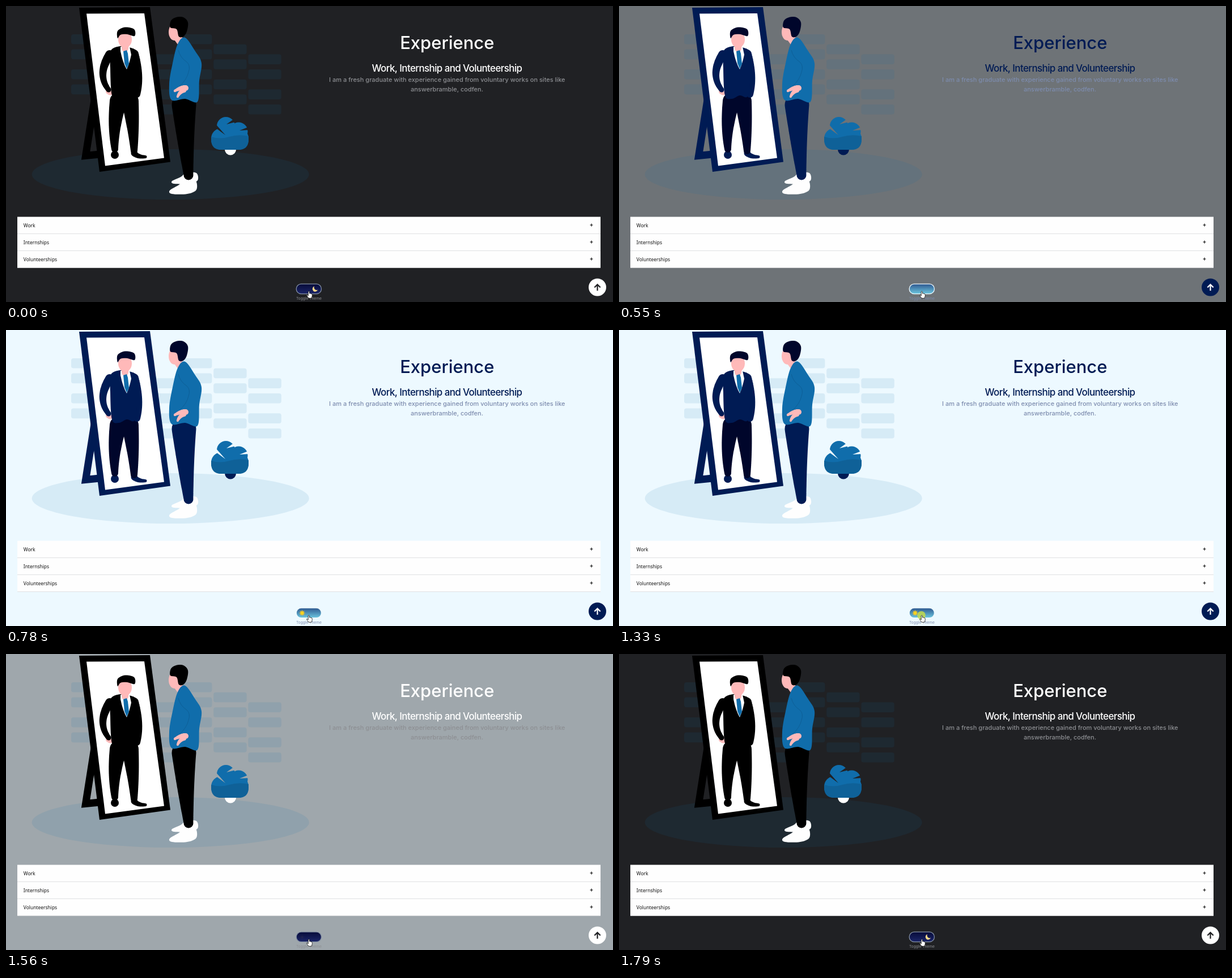
Recreate the animation shown at these times as an HTML page with a canvas. Size 1071 by 523 pixels, loop 1.87 s.

```html
<!DOCTYPE html>
<html lang="en">
<head>
<meta charset="utf-8">
<title>Theme toggle</title>
<style>
html, body { margin: 0; width: 100%; height: 100%; overflow: hidden; background: #202124; }
canvas { display: block; width: 1071px; height: 523px; }
</style>
</head>
<body>
<canvas id="stage"></canvas>
<script>
const W = 1071, H = 523, LOOP = 1870;
const TO_LIGHT = 470, TO_DARK = 1480, PRESS = 150;
const canvas = document.getElementById('stage');
const ctx = canvas.getContext('2d');
const ratio = window.devicePixelRatio || 1;
canvas.width = W * ratio;
canvas.height = H * ratio;

const BLUE = '#106dab', SKIN = '#ffb9b9', WHITE = '#ffffff';
const DARK = { ink: '#000000', deep: '#000000', title: WHITE, para: '#8d8f93', pot: WHITE,
  button: WHITE, arrow: '#202124', ring: '#8390a4', top: '#080d3c', bottom: '#1b2567' };
const LIGHT = { ink: '#001b54', deep: '#00062b', title: '#001b54', para: '#7d8cae', pot: '#001b54',
  button: '#001b54', arrow: WHITE, ring: '#edf9ff', top: '#315d93', bottom: '#6bc3dd' };

const lerp = (a, b, k) => a + (b - a) * k;

// The fade is shown in four held steps with an ease-out.
function fade(t, start) {
  const step = Math.floor((t - start + 3) / 77.5);
  return Math.min(Math.max(step / 4, 0), 1) ** .7;
}

function fill(color, path) {
  ctx.fillStyle = color;
  ctx.fill(path);
}

function line(color, width, path) {
  ctx.strokeStyle = color;
  ctx.lineWidth = width;
  ctx.stroke(new Path2D(path));
}

function ellipse(color, x, y, rx, ry = rx) {
  const path = new Path2D();
  path.ellipse(x, y, rx, ry, 0, 0, Math.PI * 2);
  fill(color, path);
}

function pill(color, x, y, w, h, r) {
  const path = new Path2D();
  path.roundRect(x, y, w, h, r);
  fill(color, path);
}

// Closed smooth curve through a few key points.
function blob(color, p) {
  const n = p.length, at = i => p[(i + n) % n], path = new Path2D();
  path.moveTo(...p[0]);
  for (let i = 0; i < n; i++) {
    const [a, b, c, d] = [at(i - 1), at(i), at(i + 1), at(i + 2)];
    path.bezierCurveTo(b[0] + (c[0] - a[0]) / 6, b[1] + (c[1] - a[1]) / 6,
      c[0] - (d[0] - b[0]) / 6, c[1] - (d[1] - b[1]) / 6, c[0], c[1]);
  }
  fill(color, path);
}

// Tapered limb: discs along a curve from a over b to c.
function limb(color, a, b, c, r0, r1) {
  const path = new Path2D(), n = 60;
  for (let i = 0; i <= n; i++) {
    const k = i / n, r = lerp(r0, r1, k);
    const [x, y] = [0, 1].map(j => lerp(lerp(a[j], b[j], k), lerp(b[j], c[j], k), k));
    path.moveTo(x + r, y);
    path.arc(x, y, r, 0, Math.PI * 2);
  }
  fill(color, path);
}

function label(text, x, y, font, color, align = 'center', spacing = 0) {
  ctx.font = font;
  ctx.textAlign = align;
  ctx.letterSpacing = spacing + 'px';
  ctx.fillStyle = color;
  ctx.fillText(text, x, y);
}

function drawWall() {
  const tint = 'rgba(16,112,169,.1)', rows = [0, 26.6, 62, 88.6];
  ellipse(tint, 290.2, 297.5, 244.5, 44.5);
  const column = (x, shift) => rows.forEach(y => pill(tint, x, 50 + shift * 17.65 + y, 58.4, 17.6, 4));
  for (let i = 0; i < 3; i++) column(305 + i * 61.2, i);
  column(243.6, 2);
  column(115, 0);
}

function drawMirror(c) {
  line(c.ink, 13, 'M157 160L140.6 264.4L165 262');
  fill(c.ink, new Path2D('M129 3L254 2L290 275.5L165 293Z'));
  fill(WHITE, new Path2D('M142 13.5L244 13L279 268.5L175 282.5Z'));
}

function drawReflection(c) {
  ellipse(c.ink, 192, 263, 7);
  limb(c.ink, [226, 260], [232, 267], [246, 266.5], 5.5, 2.5);
  limb(c.deep, [198, 168], [189, 215], [192, 253], 15, 6);
  limb(c.deep, [219, 168], [225, 215], [226, 256], 15, 6);
  limb(SKIN, [180, 151], [182, 153], [184, 154], 4, 3.5);
  limb(c.ink, [183, 86], [160, 121], [181, 148], 8, 4.5);
  limb(c.ink, [226, 85], [238, 125], [231, 156], 8, 6);
  blob(c.ink, [[202, 71], [185, 79], [184, 110], [187, 158], [199, 164], [213, 158],
    [228, 158], [232, 110], [231, 81], [217, 73]]);
  fill(WHITE, new Path2D('M202 72L218 72L221 86Q218 101 213 112Q206 100 202 80Z'));
  ellipse(SKIN, 210, 59, 12, 15);
  limb(SKIN, [210, 67], [210, 71], [210, 75], 7, 6);
  fill(BLUE, new Path2D('M207 80L213 78L215 84L217 102L213 111L209 101Z'));
  blob(c.deep, [[197, 57], [197, 44], [210, 37.5], [226, 41], [227, 53], [214, 50], [202, 51]]);
}

function sneaker(x, y, w, h) {
  const shape = [[0, .75], [.35, .35], [.55, 0], [.95, 0], [1, .7], [.65, 1], [.08, 1]];
  blob('#fefefe', shape.map(([u, v]) => [x + u * w, y + v * h]));
}

function drawMan(c) {
  sneaker(293, 295, 45, 19);
  sneaker(289, 307, 47, 25);
  limb(c.ink, [314, 175], [316, 232], [322, 299], 21.5, 8.5);
  ellipse(SKIN, 297, 46, 10, 15);
  limb(SKIN, [302, 55], [306, 60], [310, 66], 7, 7);
  blob(BLUE, [[316, 56], [303, 67], [294, 101], [288, 138], [292, 166], [316, 164],
    [338, 169], [341, 132], [345, 101], [334, 80]]);
  line('#0d5c92', .8, 'M304 78Q307 91 319 99Q326 105 322 117Q319 130 306 142');
  limb(SKIN, [317, 145], [310, 143], [298, 150], 5, 2.2);
  limb(SKIN, [314, 149], [306, 152], [303, 160], 4, 2.2);
  blob(c.deep, [[290, 38], [291, 26], [300, 20], [313, 20], [321, 29], [319, 45],
    [313, 54], [305, 54], [301, 41]]);
}

function drawPlant(c, bg) {
  ellipse(c.pot, 396, 253.5, 10);
  ellipse(BLUE, 388, 212, 16);
  ellipse(BLUE, 410.5, 221.5, 16);
  pill(BLUE, 362, 216, 66, 38, 18);
  fill('#0f6198', new Path2D('M362 231Q377 236 394 231T428 230V236Q428 254 410 254H380Q362 254 362 236Z'));
  fill(bg, new Path2D('M368 214L372 211L387 228ZM389 209L403 199L409 204ZM412 220L427 214L429 219Z'));
}

function drawTexts(c) {
  label('Experience', 778.3, 76, '500 31px Inter, sans-serif', c.title);
  label('Work, Internship and Volunteership', 778, 116, '500 17px Inter, sans-serif', c.title, 'center', -.62);
  const font = '500 11px Inter, sans-serif';
  label('I am a fresh graduate with experience gained from voluntary works on sites like', 778.3, 134, font, c.para);
  label('answerbramble, codfen.', 778, 151, font, c.para);
}

function drawAccordion() {
  ctx.fillStyle = '#fefefe';
  ctx.fillRect(20, 372.5, 1029, 90);
  ['Work', 'Internships', 'Volunteerships'].forEach((name, i) => {
    const y = 387.5 + i * 30;
    label(name, 30.8, y + 3, '500 8.45px "Noto Sans", sans-serif', '#101010', 'left');
    line('#101010', 1.2, `M1030.5 ${y - .5}h5M1033 ${y - 3}v5`);
    ctx.fillStyle = '#dedfe1';
    ctx.fillRect(20, y + 14.3, 1029, 1);
  });
}

function drawUpButton(c) {
  ellipse(c.button, 1043.5, 497, 15.5);
  line(c.arrow, 2.2, 'M1043.5 503V492M1038.3 497.3L1043.5 492.1L1048.7 497.3');
}

function drawMoon() {
  fill('#ffdc8c', new Path2D('M544 495.3A4.8 4.8 0 1 0 550 501.6A4.7 4.7 0 0 1 544 495.3Z'));
}

function drawSun() {
  for (let i = 0; i < 8; i++) {
    const a = i * Math.PI / 4, x = Math.cos(a) * 5, y = Math.sin(a) * 5;
    line('#f2bd25', 1.2, `M522.5 500l${x} ${y}`);
  }
  ellipse('#ffd21f', 522.5, 500, 3.1);
}

function drawIcon(icon, alpha) {
  ctx.globalAlpha = Math.min(Math.max(alpha, 0), 1);
  icon();
  ctx.globalAlpha = 1;
}

function drawSwitch(c, mix) {
  label('Toggle Theme', 534.4, 518.6, '400 6.6px Inter, sans-serif', c.para);
  pill(c.ring, 511.5, 490.5, 45.6, 18.8, 9.4);
  const glow = ctx.createLinearGradient(0, 492, 0, 508);
  glow.addColorStop(0, c.top);
  glow.addColorStop(1, c.bottom);
  pill(glow, 512.8, 491.8, 43, 16.2, 8.1);
  drawIcon(drawMoon, c === LIGHT ? .55 - mix * 1.4 : 1 - mix * 2.5);
  drawIcon(drawSun, c === LIGHT ? mix * 2.5 - 1.5 : mix * 1.4 - .85);
}

function drawCursor() {
  const hand = 'M533.2 512V504.8Q534.3 503.2 535.4 504.8V508Q537.3 507 537.6 508.4Q540 508 540.2 510V512.6L539 516.3H534L531.2 512.4Q529.8 510.5 531.3 510Z';
  fill(WHITE, new Path2D(hand));
  line('#111111', .8, hand);
}

function draw(t) {
  const mix = fade(t, TO_LIGHT) - fade(t, TO_DARK);
  const c = t >= TO_LIGHT && t < TO_DARK ? LIGHT : DARK;
  const bg = `rgb(${[lerp(32, 237, mix), lerp(33, 249, mix), lerp(36, 255, mix)].map(Math.round)})`;
  const pressed = [TO_LIGHT, TO_DARK].some(at => t >= at - PRESS && t < at);
  ctx.setTransform(ratio, 0, 0, ratio, 0, 0);
  ctx.fillStyle = bg;
  ctx.fillRect(0, 0, W, H);
  drawWall();
  drawMirror(c);
  drawReflection(c);
  drawMan(c);
  drawPlant(c, bg);
  drawTexts(c);
  drawAccordion();
  drawUpButton(c);
  drawSwitch(c, mix);
  if (pressed) ellipse('rgba(200,221,72,.82)', 533.5, 504, 7.3);
  drawCursor();
}

function tick() {
  draw(performance.now() % LOOP);
  requestAnimationFrame(tick);
}
tick();
</script>
</body>
</html>
```
